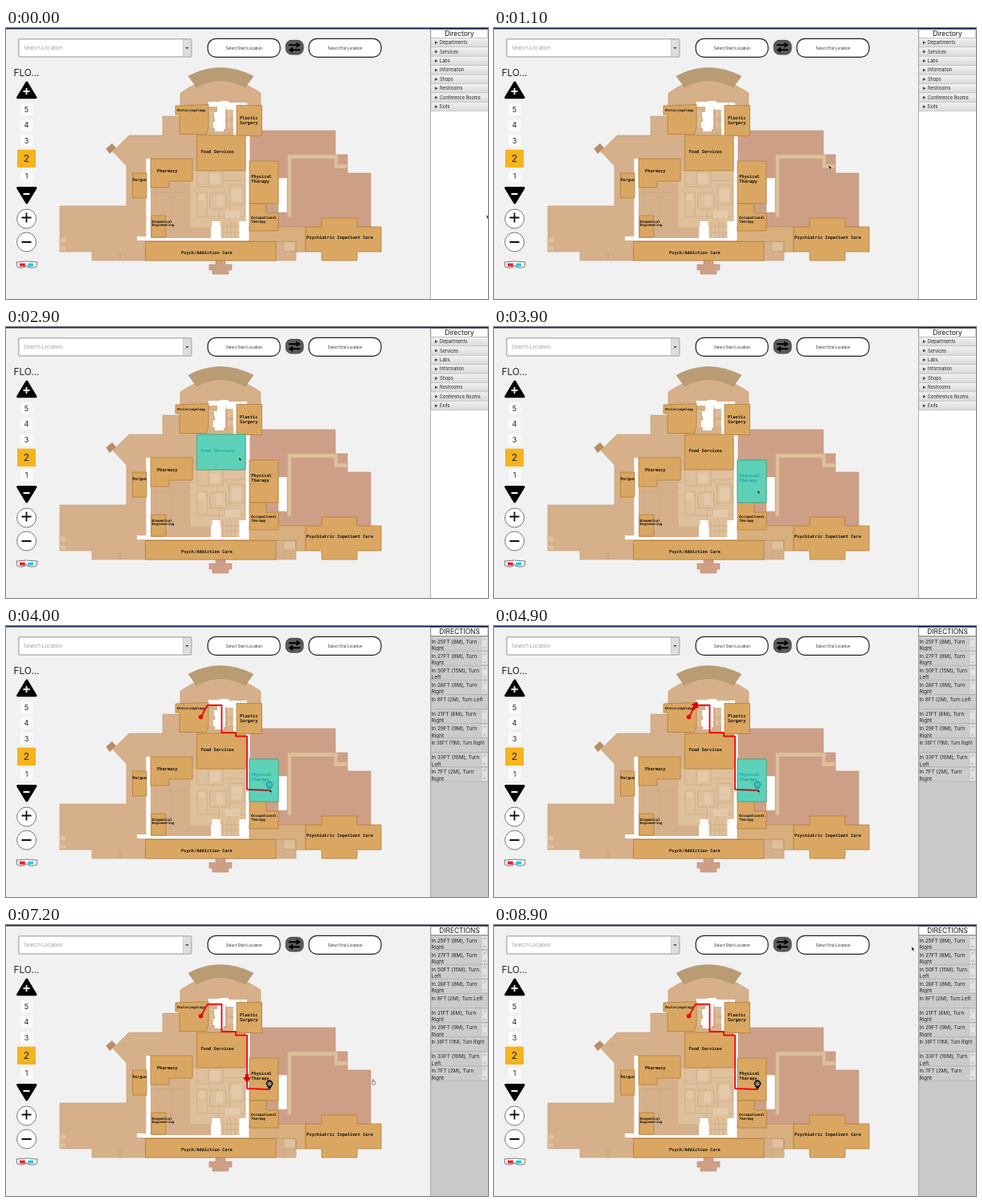
An HTML page that plays this animation: 600 by 338 pixels, repeating every 9000 ms.

```html
<!DOCTYPE html>
<html lang="en">
<head>
<meta charset="utf-8">
<title>Floor map directions</title>
<style>
html, body { margin: 0; width: 100%; height: 100%; overflow: hidden; background: #f1f1f1; }
svg { display: block; width: 100vw; height: 100vh; }
text { font-family: Inter, "Liberation Sans", sans-serif; }
.room text { font-family: "DejaVu Sans Mono", monospace; font-weight: bold; }
.room polygon { fill: #daa762; stroke: #b07f38; stroke-width: .8; }
.tan { fill: #d6b08b; stroke: #c39b75; stroke-width: .6; }
.pink { fill: #ce9f87; stroke: #b98b70; stroke-width: .6; }
.pale { fill: #dec09d; stroke: #cfab85; stroke-width: .6; }
.hall { fill: #fff; }
.edge { fill: none; stroke: #c8a279; stroke-width: .6; }
</style>
</head>
<body>
<svg id="stage" viewBox="0 0 600 338" preserveAspectRatio="none">
  <defs>
    <linearGradient id="bar" x2="0" y2="1">
      <stop offset="0" stop-color="#f2f2f2"/><stop offset="1" stop-color="#d9d9d9"/>
    </linearGradient>
  </defs>
  <rect width="600" height="338" fill="#f1f1f1"/>

  <g id="toolbar">
    <rect x="15.7" y="13.7" width="215" height="22.3" rx="1.5" fill="#fff" stroke="#b5b5b5" stroke-width="1.6"/>
    <rect x="220.5" y="14.5" width="9.6" height="20.8" fill="#dedede" stroke="#bdbdbd" stroke-width=".6"/>
    <path d="M223.4 24h4l-2 2.5z" fill="#444"/>
    <g fill="#fff" stroke="#222" stroke-width="1.2">
      <rect x="251.2" y="13.3" width="90" height="23" rx="10"/>
      <rect x="377" y="13.3" width="90" height="23" rx="10"/>
    </g>
    <rect x="348.3" y="15.3" width="21.8" height="17.8" rx="7" fill="#5c5c5c" stroke="#333" stroke-width=".8"/>
    <path d="M352 20.2h9.500v-2.700l5.500 3.700-5.500 3.600v-2.600h-9.500zM366.500 26.200h-9.500v-2.600l-5.500 3.600 5.500 3.700v-2.700h9.500z" fill="#000"/>
  </g>

  <g id="floors">
    <g stroke="#000" stroke-width="3" stroke-linejoin="round">
      <path d="M25.800 68L37 86.700H14.600zM25.800 218L37 199.500H14.600z"/>
    </g>
    <path d="M21.500 79h8M25.500 75v8M21.500 207h8" stroke="#fff" stroke-width="1.800"/>
    <rect x="14" y="151.700" width="23" height="22.300" fill="#f5b31e"/>
  </g>

  <g id="zoom">
    <g fill="#fff" stroke="#777" stroke-width="1">
      <circle cx="25.600" cy="238" r="12"/><circle cx="25.600" cy="267" r="12"/>
    </g>
    <path d="M19.500 236.500h12M25.500 230.500v12M19.500 267h12" stroke="#111" stroke-width="1.800"/>
    <path d="M13 292q12.500-2 26 0l-1 6q-6 2.500-11 0l-1.500-2-1.500 2q-5 2.500-10 0z" fill="#fff" stroke="#555" stroke-width=".8"/>
    <rect x="17" y="293.500" width="6.800" height="4" fill="#e5202b"/>
    <rect x="27.300" y="293.500" width="6.800" height="4" fill="#25c8da"/>
  </g>

  <g id="map">
    <path class="pink" d="M303 128H410V158H425V181H454V248H303z"/>
    <path class="pale" d="M350.500 158H413V170H425V175H408.500V163H355V236H350.500z"/>
    <path class="hall" d="M339 187h11v43h-11z" stroke="#c39b75" stroke-width=".5"/>
    <path class="tan" d="M217 81Q267 46 317 81V134H303V248H373V279H361V290H142V279H142V290H107V279H67V222H150V172L133 154 153 134H195V110H217z"/>
    <path d="M227 60Q267 39 308 60L298 74Q267 57 237 74z" fill="#b99c73" stroke="#a98c64" stroke-width=".5"/>
    <path d="M124.500 150.500L132 144 137 149.500 129 157z" fill="#b98b65"/>
    <path class="pink" d="M261 290H273V295H281V302H277V307H257V302H253V295H261z"/>
    <path class="pale" d="M232 178H298V262H255V249H229V191H232z"/>
    <path class="edge" d="M238 178v20h14v-20M252 198h18v-20M270 190h28M238 205v30h12v-30zM254 206h20v20h-20zM278 196h18v24h-18zM250 235h46M265 226v15M278 220v21M180 205h49M205 199v55M150 181h7M67 261h8v17M336 266v24M346 266v24M361 266v13M346 279h15"/>
    <path d="M240 207h8v8h-8zM254 182h12v12h-12zM262 208h8v14h-8zM281 200h12v16h-12zM273 228h18v9h-18z" fill="#e4caaa"/>
    <path class="pale" d="M67 261h8v7h-8zM67 272h8v6h-8zM346 267h14v11h-14z"/>

    <g class="hall">
      <path d="M174.500 163h5.500v99h75v-14h1.500v-7h10v7h1v14h23v-21h8v-106h5v130H163v-5h11.500z"/>
      <path d="M252 92h14v-1h11v2h23v5h-10v4h-3v33h16v5h-6v-4h-14v-34h-10v24h-2v3h-11v-4h-2v-8h2v-5h-1v-7h4v-7h-12z"/>
    </g>
    <path d="M249 104h9v21h-9zM276 103h7v10h-7zM276 116h7v8h-7z" fill="#dec09d"/>
    <path class="edge" d="M249 107h9M249 111h9M249 115h9M249 119h9M249 123h9M280 103v21M292 93v5M274 98v30M270 242v20M275 242v20M280 242v20M285 242v20M270 248h20M270 255h20" stroke="#b98f62"/>
    <path d="M303 248h70v31h-12v-13h-58z" fill="#d9b07d" stroke="#b88a4c" stroke-width=".6"/>
    <g id="rooms"></g>
  </g>

  <g id="route">
    <g id="pin">
      <path d="M328 206L324.800 200.500A4.200 4.200 0 1 1 331.200 200.500z" fill="#111"/>
      <circle cx="328" cy="198" r="2.300" fill="#777" stroke="#ccc" stroke-width=".6"/>
    </g>
  </g>
  <polygon id="glow" fill="#28e3dd" fill-opacity=".7" stroke="#2bb5a0" stroke-width=".8"/>
  <g id="track">
    <polyline id="line" fill="none" stroke="#ea0a14" stroke-width="1.900" stroke-linejoin="round"/>
    <path id="shade" d="M303 204.100L328 204.900" stroke="#7b4038" stroke-width="1.500"/>
    <circle cx="242.500" cy="113.500" r="2.800" fill="#ea0a14"/>
    <path id="arrow" d="M6 0L-1-5V-2H-5V2H-1V5z" fill="#d8000c"/>
  </g>

  <g id="directory"><rect x="528.500" y="1" width="72" height="338" fill="#fff"/></g>
  <g id="directions"><rect x="528.500" y="1" width="72" height="338" fill="#c9c9c9"/></g>
  <path d="M528.500 1V338" stroke="#999" stroke-width=".8"/>
  <rect width="600" height="1.500" fill="#16294d"/>

  <g id="cursor">
    <path id="pointer" d="M0 0V5.200L1.300 4.100 2.200 6 3.100 5.500 2.300 3.800H3.900z" fill="#111" stroke="#fff" stroke-width=".4"/>
    <path id="hand" d="M.8 0Q1.700 0 1.700 1V2.500L3.800 3.200V5L3 6.500H.9L-.5 4Q0 3.200.3 3.600z" fill="#fff" stroke="#333" stroke-width=".6"/>
  </g>
</svg>
<script>
const LOOP = 9000, STEP = 100;
const ROUTE_AT = 4000, WALK_AT = 4260, WALK_FOR = 4000;
const $ = id => document.getElementById(id);

function add(parent, tag, attrs, content = "") {
  const el = document.createElementNS("http://www.w3.org/2000/svg", tag);
  for (const key in attrs) el.setAttribute(key, attrs[key]);
  el.textContent = content;
  parent.append(el);
  return el;
}

// y is the middle of the capitals
function label(parent, content, x, y, size, attrs = {}) {
  return add(parent, "text", { x, y: y + size * .36, "font-size": size, fill: "#222", ...attrs }, content);
}

const middle = { "text-anchor": "middle" };
const box = (x1, y1, x2, y2) => `${x1},${y1} ${x2},${y1} ${x2},${y2} ${x1},${y2}`;

// outline, text size, x, y, lines
const rooms = [
  ["211,97 252,95.5 252,124 249.5,132.5 216,132.5 216,108 211,108", 4.2, 213, 102.5, "Otolaryngology"],
  [box(287, 96.5, 318.5, 134.5), 5.3, 291, 112, "Plastic", "Surgery"],
  [box(237.5, 134, 298, 178), 5.3, 242.5, 154.5, "Food Services"],
  ["180,163 232,163 232,191 203,191 203,199 180,199", 5.3, 188, 178, "Pharmacy"],
  [box(157.5, 181, 175, 212), 4.8, 157.5, 189.5, "Morgue"],
  [box(181, 234, 199, 261), 4.2, 181.5, 241, "Biomedical", "Engineering"],
  [box(303, 166, 339, 219), 5.3, 305.3, 185.5, "Physical", "Therapy"],
  ["303,219 324,219 324,231 339,231 339,253 303,253", 4.4, 305, 236, "Occupational", "Therapy"],
  ["373,248 393,248 393,237 437,237 437,248 467,248 467,279 437,279 437,290 393,290 393,279 373,279", 5.3, 374, 261, "Psychiatric Inpatient Care"],
  [box(173.5, 266.5, 336, 290), 5.3, 218, 280, "Psych/Addiction Care"]
];
const THERAPY = 6;

for (const [points, size, x, y, ...lines] of rooms) {
  const g = add($("rooms"), "g", { class: "room" });
  add(g, "polygon", { points });
  lines.forEach((line, i) => label(g, line, x, y + i * size * 1.13, size, { fill: "#111" }));
}
const outlines = rooms.map(room => room[0].split(" ").map(p => p.split(",").map(Number)));

label($("toolbar"), "Search Location", 22, 24.8, 6.3, { fill: "#999" });
label($("toolbar"), "Select Start Location", 296.3, 25, 4.6, middle);
label($("toolbar"), "Select End Location", 422, 25, 4.6, middle);
label($("floors"), "FLO...", 9.5, 55.5, 11.8);
[101.5, 121, 140.5, 162.8, 184.8].forEach((y, i) => {
  const chosen = i === 3;
  if (!chosen) add($("floors"), "rect", { x: 18, y: y - 7.5, width: 15.5, height: 15, fill: "#fafafa" });
  label($("floors"), 5 - i, 25.5, y, chosen ? 12 : 9, middle);
});

function header(panel, title) {
  add(panel, "rect", { x: 528.8, y: 1.5, width: 71.2, height: 10.8, fill: "#fff", stroke: "#444", "stroke-width": .6 });
  label(panel, title, 564.5, 7, 8.4, { ...middle, fill: "#111" });
}

header($("directory"), "Directory");
["Departments", "Services", "Labs", "Information", "Shops", "Restrooms", "Conference Rooms", "Exits"].forEach((name, i) => {
  const y = 12.4 + i * 11.42;
  add($("directory"), "rect", { x: 528.8, y, width: 72, height: 11.42, fill: "url(#bar)", stroke: "#b9b9b9", "stroke-width": .6 });
  add($("directory"), "path", { d: `M534 ${y + 3.8}l3.500 2-3.500 2z`, fill: "#444" });
  label($("directory"), name, 540, y + 5.8, 5.6);
});

header($("directions"), "DIRECTIONS");
["25FT (8M)|Right", "27FT (8M)|Right", "50FT (15M)|Left", "26FT (8M)|Right", "8FT (2M) Left",
 "21FT (6M)|Right", "29FT (9M)|Right", "36FT (11M) Right", "33FT (10M)|Left", "7FT (2M)|Right"].forEach((turn, i) => {
  const g = $("directions"), y = 13 + i * 18.1;
  const [first, second] = ("In " + turn.replace(")", "), Turn")).split("|");
  add(g, "rect", { x: 529, y, width: 71, height: 18.1, fill: "#cbcbcb", stroke: "#aeaeae", "stroke-width": .6 });
  label(g, first, 529.6, y + 6.2, first.length > 23 ? 5.6 : second ? 6.45 : 6.2);
  if (!second) return;
  label(g, second, 529.6, y + 14.6, 6.45);
  add(g, "rect", { x: 592, y: y + .8, width: 7.5, height: 16.5, fill: "#e2e2e2", stroke: "#b5b5b5", "stroke-width": .4 });
  add(g, "path", { d: `M594 ${y + 5}l1.700-2 1.700 2M594 ${y + 13}l1.700 2 1.700-2`, fill: "none", stroke: "#888", "stroke-width": .7 });
});

const path = [[242.5, 113.5], [251, 98.7], [268.5, 98.7], [268.5, 133], [286, 133], [286, 137.5], [300, 137.5], [300, 204], [328, 205]];
$("line").setAttribute("points", path.join(" "));

// time, x, y of the pointer tip
const moves = [
  [0, 598.5, 233], [1000, 446, 181], [1700, 242.5, 111], [2400, 242.5, 111], [3300, 328, 203],
  [6400, 328, 203], [7000, 453, 194], [7200, 456, 192.5], [7800, 517, 13], [8400, 518.5, 18], [8900, 520, 27]
];

function pointerAt(t) {
  const next = moves.findIndex(m => m[0] > t);
  if (next < 0) return moves[moves.length - 1].slice(1);
  const [t0, x0, y0] = moves[next - 1], [t1, x1, y1] = moves[next];
  const k = (t - t0) / (t1 - t0);
  return [x0 + (x1 - x0) * k, y0 + (y1 - y0) * k];
}

function inside([x, y], points) {
  let hit = false;
  points.forEach(([x1, y1], i) => {
    const [x2, y2] = points[(i + 1) % points.length];
    if (y1 > y !== y2 > y && x < x1 + (x2 - x1) * (y - y1) / (y2 - y1)) hit = !hit;
  });
  return hit;
}

// short acceleration, steady walk, short braking
function easeBoth(k) {
  if (k < .2) return 3.125 * k * k;
  if (k > .8) return 1 - 3.125 * (1 - k) ** 2;
  return 1.25 * k - .125;
}

const legs = path.slice(1).map(([x, y], i) => Math.hypot(x - path[i][0], y - path[i][1]));
const total = legs.reduce((a, b) => a + b);

function placeArrow(k) {
  let left = easeBoth(k) * total, i = 0;
  while (i < legs.length - 1 && left > legs[i]) left -= legs[i++];
  const [x0, y0] = path[i], [x1, y1] = path[i + 1], f = left / legs[i];
  const angle = Math.atan2(y1 - y0, x1 - x0) * 180 / Math.PI;
  $("arrow").setAttribute("transform", `translate(${x0 + (x1 - x0) * f} ${y0 + (y1 - y0) * f}) rotate(${angle})`);
}

function show(id, on) {
  $(id).style.display = on ? "" : "none";
}

function draw(t) {
  const tip = pointerAt(t), routed = t >= ROUTE_AT;
  const hover = outlines.findIndex(points => inside(tip, points));
  show("glow", hover >= 0);
  if (hover >= 0) $("glow").setAttribute("points", rooms[hover][0]);
  show("route", routed);
  show("track", routed);
  show("shade", hover === THERAPY);
  show("directory", !routed);
  show("directions", routed);

  const walked = (t - WALK_AT) / WALK_FOR;
  show("arrow", walked >= 0 && walked <= 1);
  if (walked >= 0 && walked <= 1) placeArrow(walked);

  const waiting = t >= 7100 && t < 7300;
  show("hand", waiting);
  show("pointer", !waiting);
  $("cursor").setAttribute("transform", `translate(${tip})`);
}

const start = performance.now();
function tick() {
  const t = (performance.now() - start) % LOOP;
  draw(Math.floor(t / STEP) * STEP);
  requestAnimationFrame(tick);
}
tick();
</script>
</body>
</html>
```
